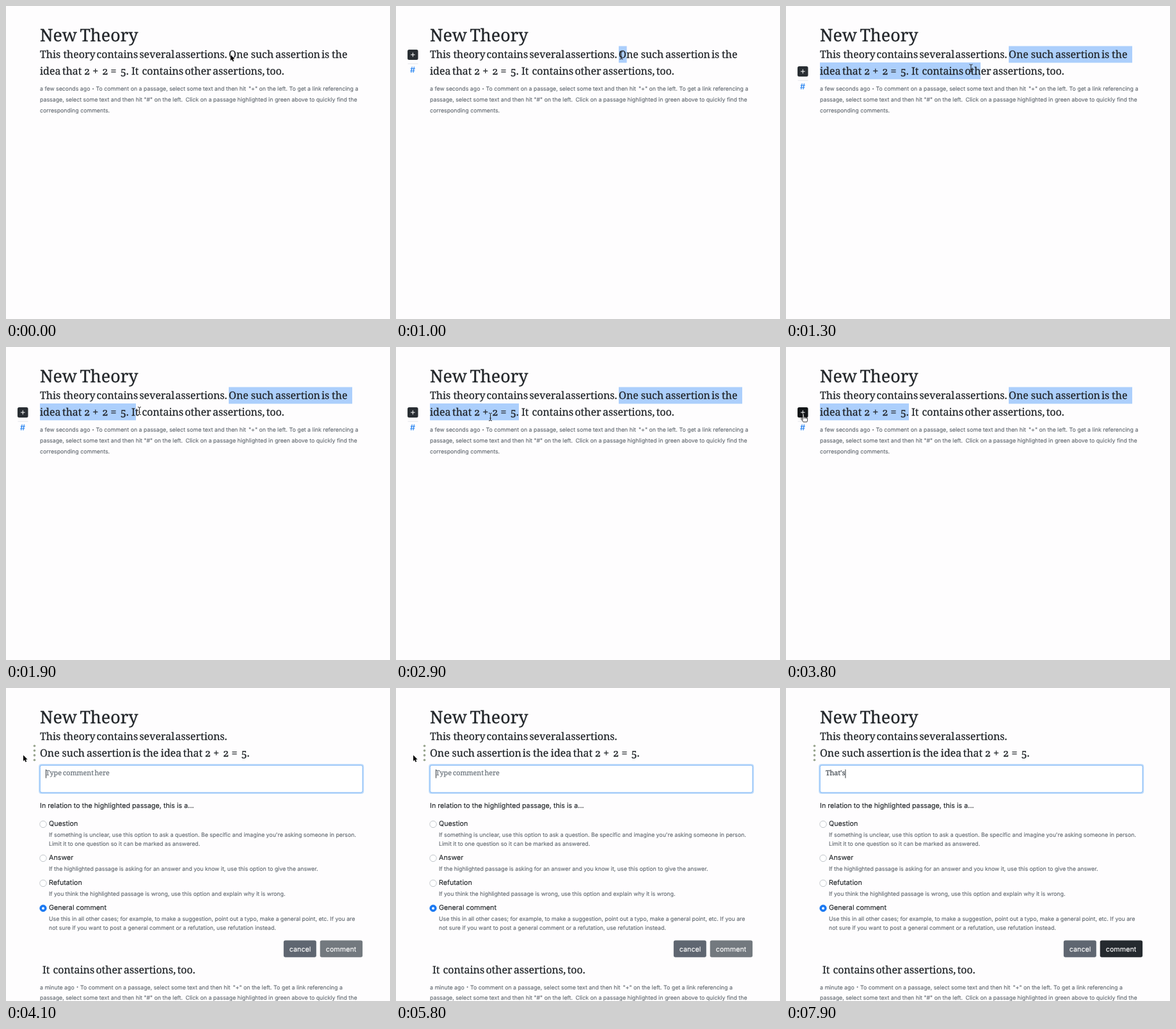
An HTML page for the animation above (8 s loop, 600 by 488 pixels).

```html
<!DOCTYPE html>
<html lang="en">
<head>
<meta charset="utf-8">
<title>New Theory</title>
<style>
  html, body { margin: 0; width: 100%; height: 100%; overflow: hidden; background: #fefdfe; }
  svg { display: block; width: 600px; height: 488px; }
  text { white-space: pre; text-rendering: geometricPrecision; }
  .serif { font-family: Georgia, "Noto Serif", serif; font-variant-numeric: oldstyle-nums; stroke-width: .28px; }
  .sans { font-family: Inter, "Open Sans", sans-serif; stroke-width: .14px; }
</style>
</head>
<body>
<svg id="stage" viewBox="0 0 600 488" xmlns="http://www.w3.org/2000/svg"></svg>
<script>
const NS = 'http://www.w3.org/2000/svg';
const INK = '#212529', MUTED = '#646b72';
const LOOP = 8000;
const stage = document.getElementById('stage');

function el(parent, tag, attrs = {}) {
  const node = document.createElementNS(NS, tag);
  for (const k in attrs) node.setAttribute(k, attrs[k]);
  parent.appendChild(node);
  return node;
}
const group = parent => el(parent, 'g');
const rect = (p, x, y, width, height, fill, rx = 0) => el(p, 'rect', { x, y, width, height, fill, rx });
const show = (node, on) => node.setAttribute('visibility', on ? 'visible' : 'hidden');

function label(parent, x, y, str, size, cls = 'sans', fill = INK) {
  const node = el(parent, 'text', { x, y, class: cls, fill, stroke: fill, 'font-size': size });
  node.textContent = str;
  return node;
}
const body = (p, x, y, s, fill) => label(p, x, y, s, 10.72, 'sans', fill);
const small = (p, x, y, s) => label(p, x, y, s, 8.81, 'sans', MUTED);

// Sets a phrase word by word; offsets are the word starts.
function phrase(parent, x, y, str, offsets, size = 16, fill = INK) {
  str.split(' ').forEach((w, i) => label(parent, x + offsets[i], y, w, size, 'serif', fill));
}
const opening = (p, x, y) => phrase(p, x, y, 'This theory contains several assertions.', [0, 36.4, 88.4, 155.4, 211.5]);
const claim = (p, x, y) => phrase(p, x, y, 'One such assertion is the', [0, 34.6, 73, 144.8, 161]);
const idea = (p, x, y) => phrase(p, x, y, 'idea that 2 + 2 = 5.', [0, 35, 68.9, 82.3, 97.2, 110.6, 125.5]);
const closing = (p, x, y) => phrase(p, x, y, 'It contains other assertions, too.', [0, 16.4, 83.4, 127.1, 210.7]);

function age(parent, y, when, x) {
  const g = group(parent);
  small(g, 53, y, when);
  el(g, 'circle', { cx: x - 4.4, cy: y - 3.2, r: .95, fill: MUTED });
  small(g, x, y, 'To comment on a passage, select some text and then hit');
  small(g, x + 238.5, y, '"+" on the left.');
  small(g, x + 302, y, 'To get a link referencing a');
  return g;
}
function hint(parent, y) {
  small(parent, 53, y, 'passage, select some text and then hit "#" on the left.');
  small(parent, 280.5, y, 'Click on a passage highlighted in green above to quickly find the');
}

// Selection, under the text
const article = group(stage);
const lineOne = rect(article, 348, 62.5, 0, 26, '#accffc');
const lineTwo = rect(article, 53, 88, 0, 26.3, '#accffc');

phrase(stage, 53, 55.3, 'New Theory', [0, 62.4], 26.8);
opening(stage, 53, 81.4);

claim(article, 348.1, 81.4);
idea(article, 53, 107.4);
closing(article, 196, 107.4);
age(article, 132.4, 'a few seconds ago', 140.5);
hint(article, 149.3);
small(article, 53, 166.2, 'corresponding comments.');

// Toolbar beside the selection
const tools = group(article);
const plusBox = rect(tools, 18, 94, 16.5, 16, '#292e33', 2.5);
el(tools, 'path', { d: 'M23 102h6.6M26.3 98.7v6.6', stroke: '#fff', 'stroke-width': 1, fill: 'none' });
rect(tools, 18.5, 115.5, 16, 1, '#e4e5e9');
label(tools, 22, 129.7, '#', 12.6, 'sans', '#1479f0');

// Comment form
const form = group(stage);
claim(form, 53, 107.4);
idea(form, 241.8, 107.4);
for (let i = 0; i < 4; i++) el(form, 'circle', { cx: 44.5, cy: 90.3 + i * 7.3, r: 1.8, fill: '#98a58e' });

const glow = rect(form, 51.2, 118.4, 508, 46.6, '#bfdcfb', 4);
const field = rect(form, 53.2, 120.4, 504, 42.6, '#fff', 2.8);
field.setAttribute('stroke-width', 1);
const prompt = group(form);
phrase(prompt, 62, 136.4, 'Type comment here', [0, 27, 76.4], 10.7, '#6c757d');
const typed = label(form, 62, 136.4, '', 10.7, 'serif', '#495057');
const caret = rect(form, 62, 127, 1, 13.5, '#343a40');

body(form, 53, 187, 'In relation to the highlighted passage, this is a...');
[
  ['Question', 212, "If something is unclear, use this option to ask a question. Be specific and imagine you're asking someone in person.",
    'Limit it to one question so it can be marked as answered.'],
  ['Answer', 265, 'If the highlighted passage is asking for an answer and you know it, use this option to give the answer.'],
  ['Refutation', 304, 'If you think the highlighted passage is wrong, use this option and explain why it is wrong.'],
  ['General comment', 343, 'Use this in all other cases; for example, to make a suggestion, point out a typo, make a general point, etc. If you are',
    'not sure if you want to post a general comment or a refutation, use refutation instead.']
].forEach(([name, y, ...lines], i) => {
  const on = i === 3;
  el(form, 'circle', { cx: 58, cy: y + .4, r: 5.2, fill: on ? '#1a78f2' : '#fff', stroke: on ? '#1a78f2' : '#b3b9bf', 'stroke-width': .8 });
  if (on) el(form, 'circle', { cx: 58, cy: y + .4, r: 2, fill: '#fff' });
  body(form, 67, y + 3.2, name);
  lines.forEach((s, n) => small(form, 67, y + 20.3 + n * 13.3, s));
});

rect(form, 433.8, 393.5, 51, 26.3, '#5f6671', 2.8);
const send = rect(form, 490.7, 393.5, 66.4, 26.3, '#73797f', 2.8);
body(form, 442.8, 410.6, 'cancel', '#fff');
body(form, 499.8, 410.6, 'comment', '#fff');

closing(form, 57, 444.6);
const ageNew = age(form, 469.5, 'a few seconds ago', 140.5);
const ageOld = age(form, 469.5, 'a minute ago', 116);
hint(form, 486.4);

// Pointers, each with its hot spot at 0,0
const arrow = el(stage, 'path', {
  d: 'M0 0V9.2L2.1 7.3L3.6 10.6L5.2 9.9L3.8 6.6H6.6Z',
  fill: '#000', stroke: '#fff', 'stroke-width': .8, 'paint-order': 'stroke'
});
const beam = el(stage, 'path', {
  d: 'M-2.5 -6Q0 -6 0 -4.5Q0 -6 2.5 -6M0 -4.5V4.5M-2.5 6Q0 6 0 4.5Q0 6 2.5 6M-1.3 2H1.3',
  fill: 'none', stroke: '#222', 'stroke-width': 1
});
const hand = el(stage, 'path', {
  d: 'M-2 5V-4Q-2 -5.5 -1 -5.5Q0 -5.5 0 -4V-.5Q1.8 -1 2 .3Q3.7 -.2 4 1Q5.6 .8 5.6 2.3V4Q5.6 6 4.6 7.4H-1Q-2.5 5 -4.6 2.7Q-5 1.2 -3.4 1.5L-2 2.8M0 -.5V2M2 .3V2.3M4 1V2.6',
  fill: '#fff', stroke: '#111', 'stroke-width': .8, 'stroke-linejoin': 'round'
});

// Linear track over [time, ...values] keys
function track(keys, t) {
  let i = 0;
  while (i < keys.length - 2 && t >= keys[i + 1][0]) i++;
  const [a, b] = [keys[i], keys[i + 1]];
  const k = ramp(t, a[0], b[0] - a[0]);
  return a.slice(1).map((v, n) => v + (b[n + 1] - v) * k);
}
function ramp(t, from, span) {
  return Math.min(1, Math.max(0, (t - from) / span));
}
function mix(a, b, k) {
  return 'rgb(' + a.map((v, i) => Math.round(v + (b[i] - v) * k)) + ')';
}

const POINTER = [[0, 350.8, 76], [400, 350.8, 77], [800, 348, 76], [1000, 352, 77], [1200, 359, 79],
  [1300, 289, 97], [1600, 236, 99], [2100, 190, 100], [2500, 181, 103], [2900, 147.5, 109],
  [3000, 112, 109], [3300, 42, 109], [3500, 29, 109], [3800, 28, 109.5], [3900, 27, 104.8], [4000, 27, 104.8]];
const SELECT_END = [[1300, 304], [1600, 244], [1900, 203], [2100, 192]];
const KEYS = [[6800, 'T', 6.9], [6900, 'Th', 13.4], [7000, 'Tha', 19.1], [7100, 'That', 23],
  [7800, "That'", 25.6], [7900, "That's", 30.4]];

function draw(t) {
  const open = t >= 3900, two = t >= 1300, typing = t >= 6800;
  show(article, !open);
  show(form, open);

  // The toolbar follows the line the selection ends on.
  const selecting = t >= 900 && !open;
  tools.setAttribute('visibility', selecting ? 'inherit' : 'hidden');
  tools.setAttribute('transform', `translate(0 ${two ? 0 : -26})`);
  lineOne.setAttribute('width', two ? 193 : t >= 900 ? 12.6 : 0);
  lineTwo.setAttribute('width', two ? track(SELECT_END, t)[0] - 53 : 0);

  const over = t >= 3400 && t < 3900;
  plusBox.setAttribute('fill', over ? '#131618' : '#292e33');

  const focus = ramp(t, 3900, 150);
  glow.setAttribute('opacity', focus);
  field.setAttribute('stroke', mix([206, 212, 218], [124, 181, 246], focus));
  show(ageNew, open && t < 4000);
  show(ageOld, t >= 4000);

  const key = KEYS.filter(k => t >= k[0]).pop();
  show(prompt, open && !typing);
  typed.textContent = key ? key[1] : '';
  caret.setAttribute('x', 62 + (key ? key[2] : 0));
  const lit = typing ? t < 7600 || t >= 7800 : t >= 4000 && (t < 4300 || Math.floor((t - 4300) / 500) % 2 === 1);
  show(caret, lit);
  send.setAttribute('fill', mix([115, 121, 127], [37, 42, 47], ramp(t, 6700, 150)));

  const [x, y] = track(POINTER, t);
  for (const p of [arrow, beam, hand]) p.setAttribute('transform', `translate(${x} ${y})`);
  show(arrow, t < 400 || (open && !typing));
  show(beam, t >= 400 && t < 3400);
  show(hand, over);
}

const start = performance.now();
function tick() {
  draw(Math.floor(((performance.now() - start) % LOOP) / 100) * 100);
  requestAnimationFrame(tick);
}
tick();
</script>
</body>
</html>
```
